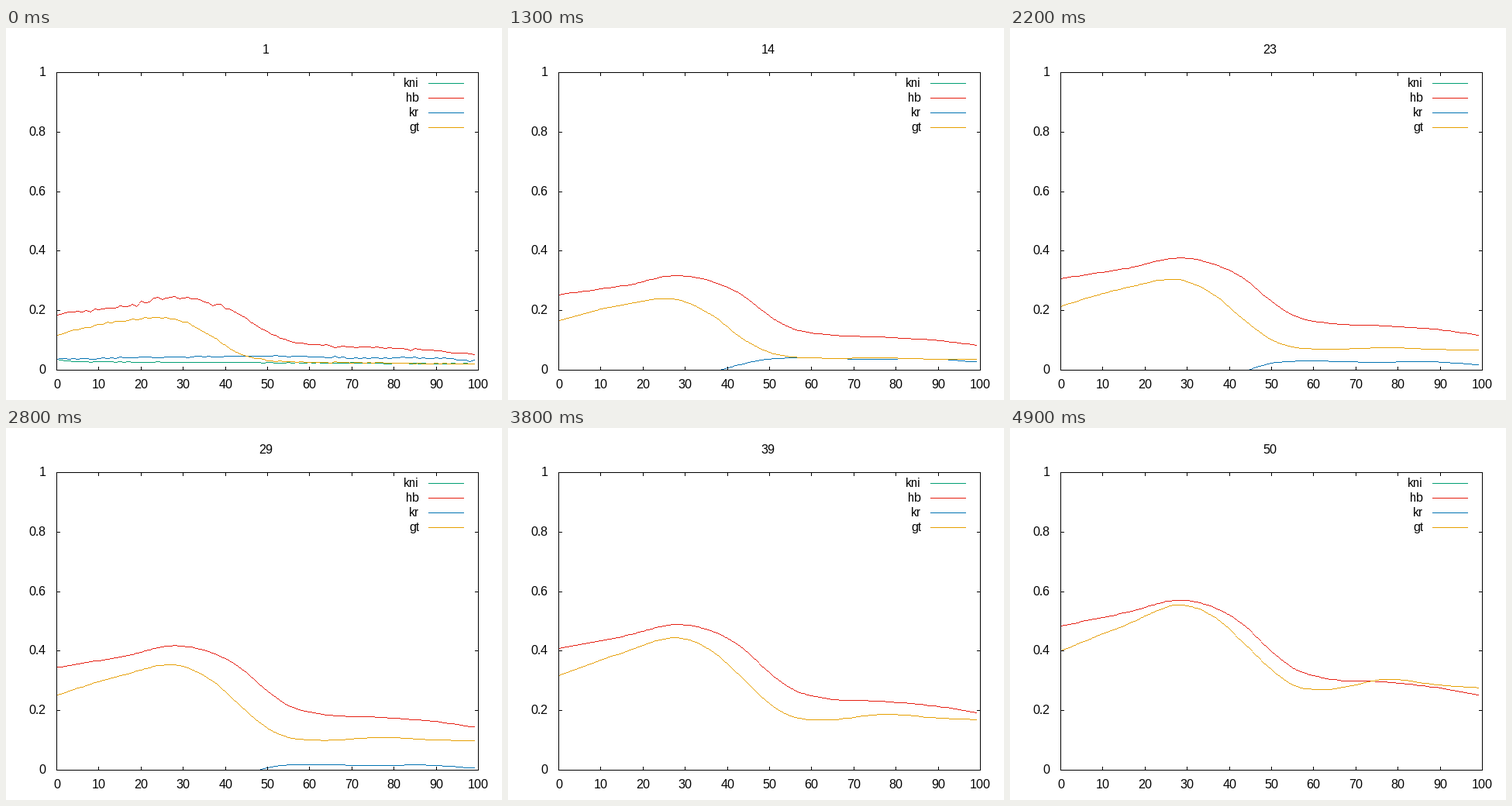
A matplotlib script that plays this animation: 640x480 px, repeating every 5000 ms.

```python
import numpy as np
import matplotlib.pyplot as plt
from matplotlib.animation import FuncAnimation
from matplotlib.patches import Rectangle

WIDTH, HEIGHT, DPI = 640, 480, 100
FRAMES, INTERVAL = 50, 100
LEFT, RIGHT, TOP, BOTTOM = 65, 609, 57, 441
TICK = 5
COLORS = {"kni": "#009e73", "hb": "#e51e10", "kr": "#0072b2", "gt": "#e69f00"}

plt.rcParams.update({
    "font.family": "Liberation Sans",
    "font.size": 16 * 72 / DPI,
    "text.hinting": "default",
    "text.hinting_factor": 1,
})

x = np.arange(100)
rng = np.random.default_rng(4)
jitter = {
    "kni": rng.normal(0, 0.7, 100),
    "hb": rng.normal(0, 1, 100) * np.where(x < 41, 4, 1.6),
    "kr": rng.normal(0, 1.3, 100),
    "gt": rng.normal(0, 1, 100) * np.where(x < 38, 2, 1),
}


def through(knots, values):
    """Smooth curve over x through a few key points."""
    knots, values = np.array(knots, float), np.array(values, float)
    slopes = np.gradient(values, knots)
    i = np.clip(np.searchsorted(knots, x, side="right") - 1, 0, len(knots) - 2)
    span = knots[i + 1] - knots[i]
    t = (x - knots[i]) / span
    bend = t * (1 - t) ** 2 * slopes[i] + t * t * (t - 1) * slopes[i + 1]
    blend = t * t * (3 - 2 * t)
    return values[i] * (1 - blend) + values[i + 1] * blend + span * bend


def rise(center, width):
    return 1 / (1 + np.exp((center - x) / width))


# Levels are in thousandths.
KNOTS = [0, 15, 30, 36, 43, 50, 56, 62, 78, 90, 99]
hb_start = through(KNOTS, [186, 212, 241, 230, 190, 128, 95, 85, 74, 66, 51])
hb_end = through(KNOTS, [483, 527, 568, 549, 493, 399, 337, 311, 295, 276, 253])
gt_start = through(KNOTS, [118, 165, 163, 121, 57, 33, 28, 26, 25, 22, 21])
gt_end = through(KNOTS, [400, 486, 553, 519, 433, 337, 281, 271, 306, 286, 277])
kr_start = through([0, 30, 55, 75, 88, 99], [37, 44, 46, 40, 41, 31])


def diffuse(noise, times):
    for _ in range(times):
        padded = np.pad(noise, 1, mode="edge")
        noise = (padded[:-2] + 2 * padded[1:-1] + padded[2:]) / 4
    return noise


def level(name, frame):
    progress = frame / (FRAMES - 1)
    if name == "kni":
        base = 28.5 - 0.07 * x + 7.5 * np.exp(-x / 2 - frame) - 6 * frame
    elif name == "kr":
        base = kr_start - 4.6 * frame * (1 - rise(41.5, 4)) - 40 * (frame / 34) ** 2.5
    elif name == "hb":
        base = hb_start + (hb_end - hb_start) * progress ** (1.13 + 0.25 * rise(52, 3))
    else:
        base = gt_start + (gt_end - gt_start) * progress ** (1.33 + 0.8 * rise(48, 3))
    return (base + diffuse(jitter[name], frame)) / 1000


def to_px(value):
    return np.round(LEFT + value * (RIGHT - LEFT) / 100)


def to_py(value):
    return np.round(BOTTOM - value * (BOTTOM - TOP))


fig = plt.figure(figsize=(WIDTH / DPI, HEIGHT / DPI), dpi=DPI, facecolor="white")
ax = fig.add_axes([0, 0, 1, 1])
ax.set_xlim(0, WIDTH)
ax.set_ylim(HEIGHT, 0)
ax.axis("off")


def bar(px, py, width=1, height=1, color="black"):
    ax.add_patch(Rectangle((px, py), width, height, facecolor=color, lw=0,
                           antialiased=False, zorder=5))


def label(px, baseline, text, align="center"):
    return ax.text(px, baseline, text, ha=align, va="baseline")


for edge in (TOP, BOTTOM):
    bar(LEFT, edge, width=RIGHT - LEFT + 1)
for edge in (LEFT, RIGHT):
    bar(edge, TOP, height=BOTTOM - TOP + 1)
for value in range(0, 101, 10):
    px = to_px(value)
    bar(px, TOP, height=TICK)
    bar(px, BOTTOM + 1 - TICK, height=TICK)
    label(px + 0.5, 465, str(value))
for value in np.arange(6) / 5:
    py = to_py(value)
    bar(LEFT, py, width=TICK)
    bar(RIGHT + 1 - TICK, py, width=TICK)
    label(51.25, py + 5, f"{value:g}", "right")

title = label(335.25, 33, "")
columns = np.arange(LEFT, to_px(99) + 1)
edges = np.append(columns, columns[-1] + 1)
plot_area = Rectangle((LEFT, TOP), RIGHT - LEFT + 1, BOTTOM - TOP + 1, transform=ax.transData)


def pixel_rows(name, frame):
    return np.round(np.interp(columns, to_px(x), to_py(level(name, frame))))


curves = {}
for i, (name, color) in enumerate(COLORS.items()):
    py = 71 + 19 * i
    label(533, py + 5, name, "right")
    bar(545, py, width=46, color=color)
    rows = pixel_rows(name, 0)
    curves[name] = ax.stairs(rows, edges, baseline=rows + 1, fill=True, color=color,
                             antialiased=False, zorder=2 + i / 10)
    curves[name].set_clip_path(plot_area)


def update(frame):
    title.set_text(str(frame + 1))
    for name, curve in curves.items():
        rows = pixel_rows(name, frame)
        curve.set_data(rows, edges, rows + 1)
    return [title, *curves.values()]


anim = FuncAnimation(fig, update, frames=FRAMES, interval=INTERVAL, repeat=True, repeat_delay=0)
plt.show()
```
